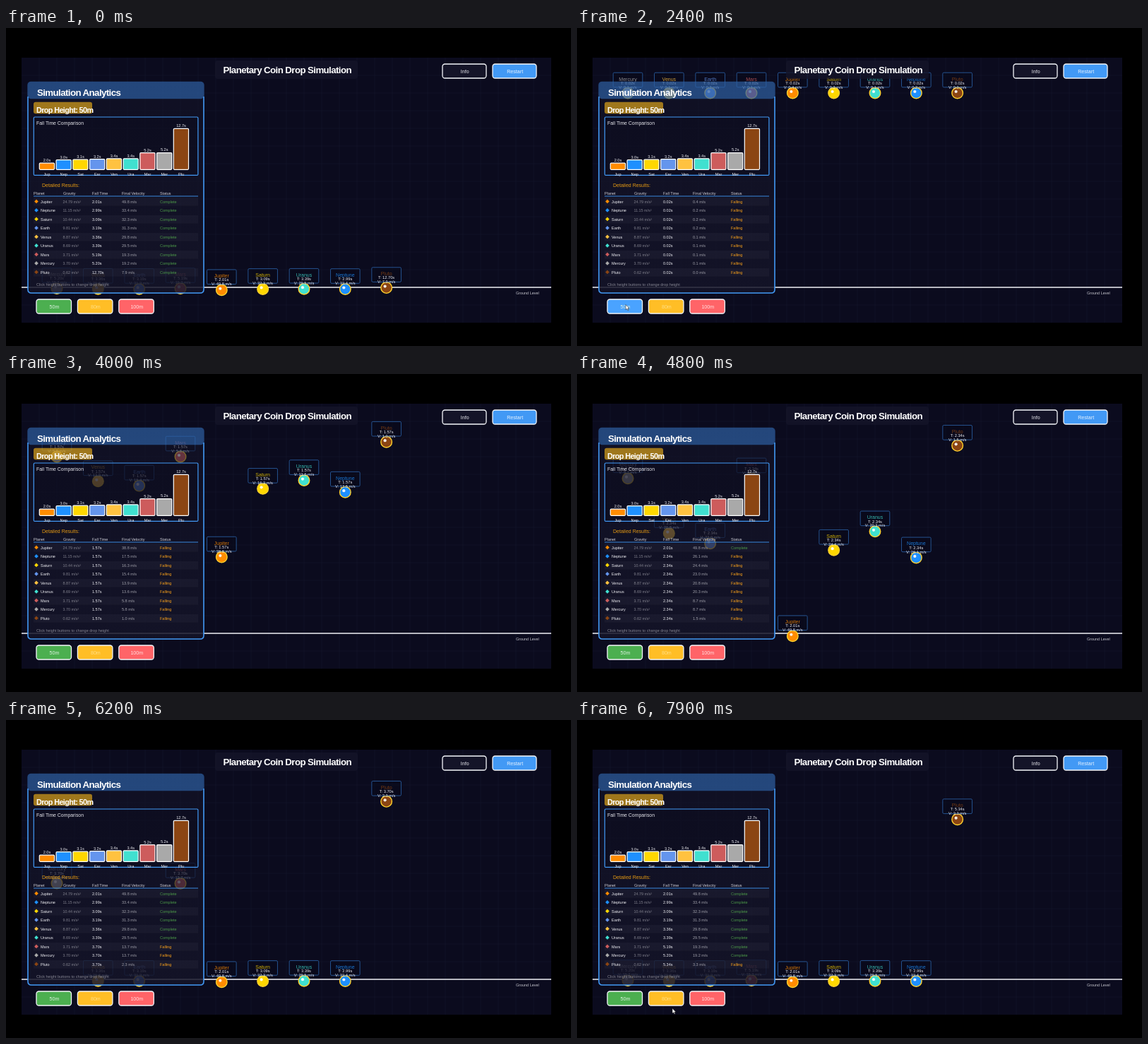
These frames come from a looping animation (800x450 px, 8000 ms). An HTML page:

```html
<!DOCTYPE html>
<html lang="en">
<head>
<meta charset="utf-8">
<title>Planetary Coin Drop Simulation</title>
<style>
html, body { margin: 0; width: 100%; height: 100%; overflow: hidden; background: #000; }
svg { display: block; width: 100vw; height: 100vh; }
text { font-family: "Liberation Sans", Arial, sans-serif; white-space: pre; }
.heading { font-weight: bold; letter-spacing: -0.6px; }
</style>
</head>
<body>
<svg id="stage" viewBox="0 0 800 450"></svg>
<script>
const LOOP = 8000, STEP = 100, RESTART = 2400;
const TOP = 92, PX_PER_METER = 5.5, HEIGHT = 50;
const BLUE = '#4299f5';

// In order of the lanes from left to right.
const planets = [
  ['Mercury', 3.70, '#a9a9a9'], ['Venus', 8.87, '#ffc240'], ['Earth', 9.81, '#6495ed'],
  ['Mars', 3.71, '#cd5c5c'], ['Jupiter', 24.79, '#ff8c00'], ['Saturn', 10.44, '#ffd700'],
  ['Uranus', 8.69, '#40e0d0'], ['Neptune', 11.15, '#1e90ff'], ['Pluto', 0.62, '#8b4513']
].map(([name, gravity, color], i) => ({
  name, gravity, color, x: 72 + i * 58.33, fallTime: Math.sqrt(2 * HEIGHT / gravity)
}));
const ranked = [...planets].sort((a, b) => a.fallTime - b.fallTime);

const stage = document.getElementById('stage');

function add(tag, attrs, parent = stage) {
  const el = document.createElementNS('http://www.w3.org/2000/svg', tag);
  for (const key in attrs) el.setAttribute(key, attrs[key]);
  parent.appendChild(el);
  return el;
}
function box(x, y, width, height, fill, attrs = {}, parent = stage) {
  return add('rect', { x, y, width, height, fill, ...attrs }, parent);
}
function line(x1, y1, x2, y2, stroke, width, parent = stage) {
  return add('line', { x1, y1, x2, y2, stroke, 'stroke-width': width }, parent);
}
// The text is centred vertically on y.
function label(content, x, y, size, fill, attrs = {}, parent = stage) {
  const el = add('text', { x, y: y + size * 0.36, 'font-size': size, fill, ...attrs }, parent);
  el.textContent = content;
  return el;
}
const middle = { 'text-anchor': 'middle' };

function button(caption, x, y, width, fill, ink) {
  const shape = box(x, y, width, 20, fill, { rx: 3.5, stroke: '#f4f6fa', 'stroke-width': 1.3 });
  label(caption, x + width / 2 + 0.7, y + 10.5, 7.1, ink, middle);
  return shape;
}

function buildBackdrop() {
  box(0, 0, 800, 450, '#000');
  box(22, 42, 750, 375, '#0b0b1e');
  const grid = add('g', { opacity: 0.035 });
  for (let x = 47; x < 772; x += 25) line(x, 42, x, 417, '#9ab8ff', 1, grid);
  for (let y = 67; y < 417; y += 25) line(22, y, 772, y, '#9ab8ff', 1, grid);
  line(22, 367, 772, 367, '#f0f0f4', 1.6);
  label('Ground Level', 722, 375.5, 5.45, '#c8c8d0');
}

function buildCoin(planet) {
  const g = planet.coin = add('g', {});
  add('circle', { r: 7.8, fill: planet.color, stroke: '#ffd12e', 'stroke-width': 1.4 }, g);
  add('circle', { cx: -2, cy: -2, r: 2.1, fill: '#fff', opacity: 0.9 }, g);
  box(-20.8, -28.8, 41.6, 20.6, 'rgba(8,8,24,.45)',
    { rx: 1.5, stroke: '#2d65ad', 'stroke-width': 0.8 }, g);
  label(planet.name, 0, -20, 7, planet.color, { ...middle, opacity: 0.8 }, g);
  planet.timeTag = label('', 0, -14.3, 5.7, '#f0f0f4', middle, g);
  planet.speedTag = label('', 0, -8.4, 5.7, '#e8e8ee', middle, g);
}

function buildPanel() {
  const fade = add('linearGradient', { id: 'panelFade', x1: 0, y1: 0, x2: 0, y2: 1 });
  add('stop', { offset: 0, 'stop-color': '#141428', 'stop-opacity': 0.52 }, fade);
  add('stop', { offset: 1, 'stop-color': '#141428', 'stop-opacity': 0.86 }, fade);
  box(31, 76, 249, 299, 'url(#panelFade)', { rx: 5 });
  add('path', {
    d: 'M31 97V370q0 5 5 5H275q5 0 5-5V97', fill: 'none', stroke: BLUE, 'stroke-width': 1.6
  });
  box(30.3, 75.7, 250.4, 24.6, 'rgba(66,153,255,.4)', { rx: 5 });
  label('Simulation Analytics', 44, 91, 13.3, '#fff', { class: 'heading' });
  box(39, 104.7, 83, 16.6, 'rgba(255,188,24,.6)', { rx: 3 });
  label('Drop Height: 50m', 43, 116, 10.8, '#fff', { class: 'heading' });
}

function buildChart() {
  box(39.3, 126, 232.6, 82.4, 'rgba(10,10,28,.35)', { rx: 1.5, stroke: BLUE, 'stroke-width': 1.2 });
  label('Fall Time Comparison', 43, 135, 6.9, '#e4e4ea');
  ranked.forEach((planet, i) => {
    const x = 47.3 + i * 23.75, height = planet.fallTime / 12.7 * 58;
    box(x, 200.3 - height, 21.2, height, planet.color,
      { rx: 1.2, stroke: '#fff', 'stroke-width': 1.2 });
    label(planet.fallTime.toFixed(1) + 's', x + 10.7, 196.2 - height, 5.6, '#f0f0f4', middle);
    label(planet.name.slice(0, 3), x + 10.7, 207.2, 5.6, '#f0f0f4', middle);
  });
}

function buildTable() {
  label('Detailed Results:', 51, 222.3, 7, '#e69a12');
  const columns = [['Planet', 39], ['Gravity', 81], ['Fall Time', 122], ['Final Velocity', 164], ['Status', 218]];
  columns.forEach(([name, x]) => label(name, x, 234, 5.5, '#d0d0d8'));
  line(39, 238, 272, 238, BLUE, 0.9);
  ranked.forEach((planet, i) => {
    const y = 246 + i * 12.5;
    if (i % 2 === 0) box(39, y - 6, 233, 11.5, 'rgba(255,255,255,.03)');
    add('path', { d: `M43 ${y - 3.4}l2.8 2.8-2.8 2.8-2.8-2.8z`, fill: planet.color });
    label(planet.name, 49, y, 5.5, '#f0f0f4');
    label(planet.gravity.toFixed(2) + ' m/s²', 80.5, y, 5.4, '#82828e');
    planet.timeCell = label('', 122, y, 5.5, '#f4f4f8');
    planet.speedCell = label('', 164, y, 5.5, '#a2a2ac');
    planet.statusCell = label('', 218, y, 5.5, '');
  });
  label('Click height buttons to change drop height', 43, 363, 5.5, '#888894');
}

function buildTitle() {
  box(296, 46, 202, 26, 'rgba(20,20,40,.8)', { rx: 4 });
  label('Planetary Coin Drop Simulation', 307.5, 59.3, 13.3, '#fff', { class: 'heading' });
  button('Info', 618, 51, 62, '#141428', '#e6e6ec');
  button('Restart', 689, 51, 62, BLUE, '#e8f3ff');
}

buildBackdrop();
planets.forEach(buildCoin);
buildTitle();
buildPanel();
buildChart();
buildTable();
const lowButton = button('50m', 43, 384, 49.5, '#4caf50', '#dcf0e0');
button('80m', 101.4, 384, 49.5, '#ffbe26', '#ffdf85');
button('100m', 159.8, 384, 49.5, '#ff6468', '#ffe0e0');
const cursor = add('path', {
  d: 'M0 0V7.2L1.7 5.7 2.9 8.2 4 7.7 2.9 5.3H5z', fill: '#fff', stroke: '#111', 'stroke-width': 0.5
});

function drawPlanet(planet, clock) {
  const landed = clock >= planet.fallTime;
  const time = landed ? planet.fallTime : clock;
  const speed = planet.gravity * time;
  // Fast coins sink slightly past the ground in their last step.
  const y = TOP + PX_PER_METER * speed * time / 2 + (landed ? speed * 0.075 : 0);
  const timeText = time.toFixed(2) + 's', speedText = speed.toFixed(1) + ' m/s';
  planet.coin.setAttribute('transform', `translate(${planet.x} ${y})`);
  planet.timeTag.textContent = 'T: ' + timeText;
  planet.speedTag.textContent = 'V: ' + speedText;
  planet.timeCell.textContent = timeText;
  planet.speedCell.textContent = speedText;
  planet.statusCell.textContent = landed ? 'Complete' : 'Falling';
  planet.statusCell.setAttribute('fill', landed ? '#4c9a48' : '#ffa51a');
}

function draw(now) {
  const t = Math.floor(now % LOOP / STEP) * STEP;
  const clock = t < RESTART ? Infinity : 0.0167 + (t - RESTART) * 0.000968;
  planets.forEach(planet => drawPlanet(planet, clock));

  lowButton.setAttribute('fill', t >= 1000 && t < 2800 ? '#4aa3ff' : '#4caf50');
  const onLow = t >= 2100 && t < 2800, onEdge = t >= 6900;
  cursor.setAttribute('visibility', onLow || onEdge ? 'visible' : 'hidden');
  cursor.setAttribute('transform', onLow ? 'translate(69 391.5)' : 'translate(135 408)');
}

const start = performance.now();
function tick() {
  draw(performance.now() - start);
  requestAnimationFrame(tick);
}
tick();
</script>
</body>
</html>
```
